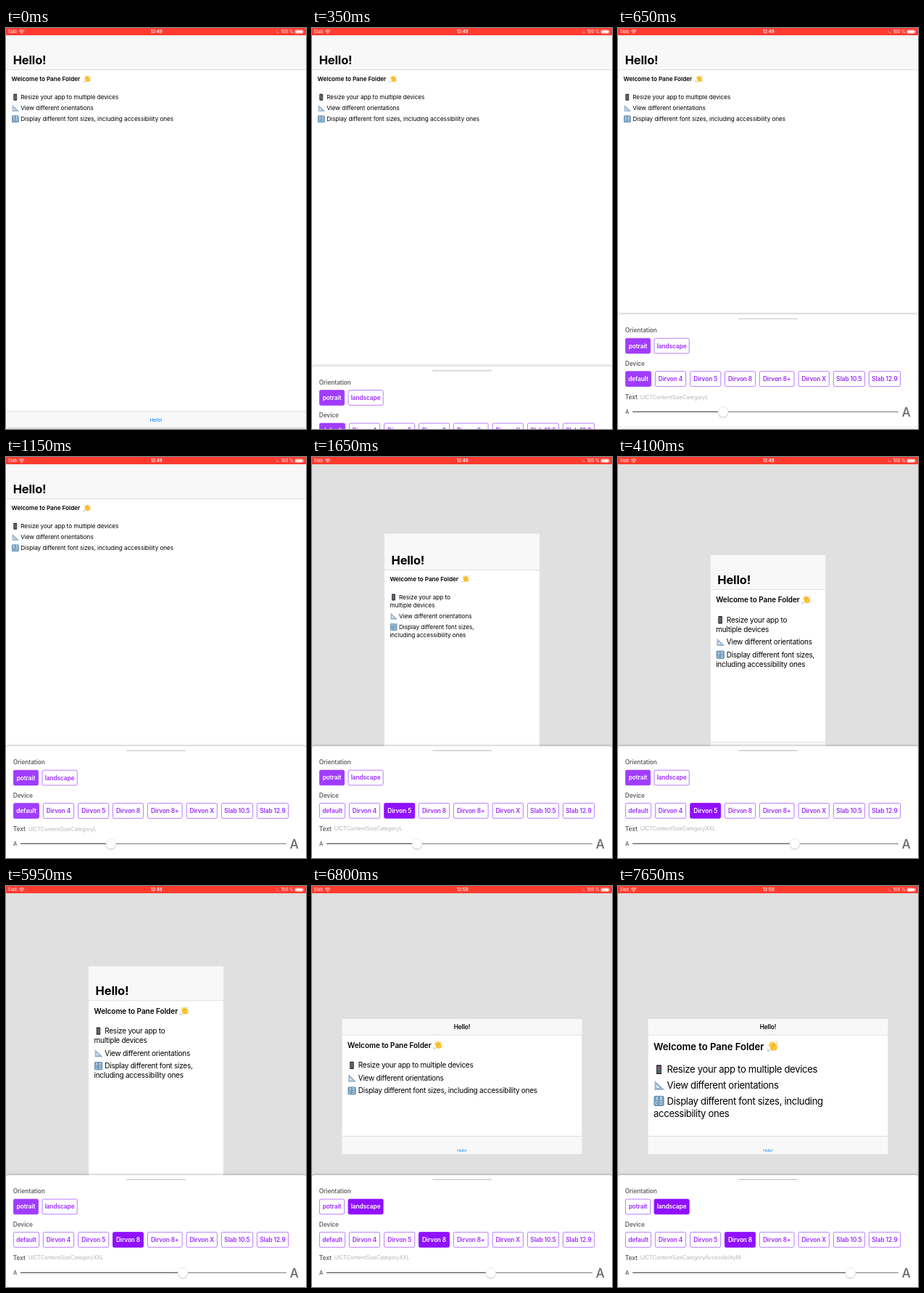
These frames come from a looping animation (414x552 px, 7700 ms). An HTML page:

```html
<!DOCTYPE html>
<html lang="en">
<head>
<meta charset="utf-8">
<title>Layout preview</title>
<style>
html, body { margin: 0; width: 100%; height: 100%; overflow: hidden; background: #e0e0e0; }
svg { display: block; }
text { font-family: Inter, "Liberation Sans", sans-serif; white-space: pre; }
#sheet { filter: drop-shadow(0 -1px 1.8px rgba(0, 0, 0, .24)); }
</style>
</head>
<body>
<svg id="stage" width="414" height="552" viewBox="0 0 414 552">
  <defs>
    <symbol id="hand" viewBox="0 0 20 20">
      <g stroke="#fcc534" stroke-linecap="round" fill="none">
        <path d="M4.6 7.2 10 12.4M6.2 4.2 12 10M9.3 2.8 14 8.6M12.6 3.4 15.6 9" stroke-width="2.6"/>
        <path d="M16.6 6.4Q15.6 9 17 12" stroke-width="2.8"/>
        <path d="M10.5 12.5 13.8 12.2" stroke-width="9.5"/>
      </g>
      <path d="M6.8 8.2 10 11.2M8.8 6 12 9.3M11.5 5 13.8 8.2" stroke="#c98a1c" stroke-width=".8" fill="none"/>
      <path d="M1.5 13.5Q2.6 17 6 18.2M1 16.3Q1.8 18.3 3.8 19.2M15.8 1.2Q18.4 1.9 19 4.4" stroke="#8ba6b8" stroke-width="1" fill="none"/>
    </symbol>
    <symbol id="phone" viewBox="0 0 20 20">
      <rect x="5.2" y="1.4" width="9.4" height="17.2" rx="1.6" fill="#25272b"/>
      <rect x="6.1" y="3.4" width="7.6" height="12.8" fill="#46536b"/>
      <path d="M6.8 5.2h6.4M6.8 8h6.4" stroke="#b7705d" stroke-width="1.5" stroke-dasharray="1.5 .95"/>
      <path d="M6.8 11h6.4M6.8 14.6h6.4" stroke="#6ea07c" stroke-width="1.5" stroke-dasharray="1.5 .95"/>
      <circle cx="9.9" cy="17.4" r=".7" fill="#777"/>
    </symbol>
    <symbol id="ruler" viewBox="0 0 20 20">
      <path d="M2 2V18H19ZM5.6 9.8 10.8 14.7H5.6Z" fill="#9db9d3" fill-rule="evenodd"/>
      <path d="M2 2 19 18H2" fill="none" stroke="#7593b2" stroke-width=".9"/>
    </symbol>
    <symbol id="abcd" viewBox="0 0 20 20">
      <rect x=".5" y=".5" width="19" height="19" rx="3" fill="#6b96b8"/>
      <g fill="#fff" font-size="8.2" font-weight="500" text-anchor="middle" opacity=".9">
        <text x="6" y="9">A</text><text x="14" y="9">B</text>
        <text x="6" y="17.2">C</text><text x="14" y="17.2">D</text>
      </g>
    </symbol>
  </defs>
  <rect width="414" height="552" fill="#e0e0e0"/>
  <g id="app"></g>
  <g id="sheet"></g>
  <g id="status"></g>
</svg>
<script>
const LOOP = 7700;
const PT = 414 / 834;
const LIGHT = '#a03cff', DEEP = '#9010ff', INK = '#666', HAIR = '#cdcdcd';
const BODY = 8.3;
const TAP = { small: 1450, large: 5050, turn: 6200 };

const sizeNames = ['XS', 'S', 'M', 'L', 'XL', 'XXL', 'XXXL', 'AccessibilityM'];
// font, tracking, title y, first gap, item pitch, line pitch, icon, hand offset
const typeScale = {
  L: [8.2, -.006, 12.5, 25, 15, 11, 10.4, 98.5],
  XL: [9.1, -.016, 13.2, 26.3, 16.2, 12, 11.2, 108],
  XXL: [10, -.024, 13.9, 27.7, 17.5, 13, 12, 118],
  XXXL: [11, -.026, 14.6, 29.4, 19, 14.5, 13.2, 130],
  AccessibilityM: [13.2, -.028, 15.6, 31.8, 21.6, 17, 15, 156]
};

const frame = (w, h, nav) => ({ w: w * PT, h: h * PT, nav: nav * PT });
const full = { w: 414, h: 552, nav: 57.8 };
const small = frame(320, 568, 96);
const large = frame(375, 667, 96);
const wide = frame(667, 375, 45);

const devices = [
  ['default', 10, 36], ['Dirvon 4', 51, 43], ['Dirvon 5', 99.2, 43], ['Dirvon 8', 147, 43],
  ['Dirvon 8+', 195, 48.5], ['Dirvon X', 248.8, 43], ['Slab 10.5', 297, 44], ['Slab 12.9', 346, 44]
];

const clamp = v => Math.max(0, Math.min(1, v));
const ease = v => v < .5 ? 2 * v * v : 1 - 2 * (1 - v) ** 2;
const mix = (a, b, k) => a + (b - a) * k;
const ramp = (t, from, to) => ease(clamp((t - from) / (to - from)));

// Text is placed by the vertical centre of its capitals.
function label(s, x, cy, size, o = {}) {
  const { weight = 400, fill = '#000', track = -.01, anchor = 'start' } = o;
  return `<text x="${x}" y="${cy + size * .36}" font-size="${size}" font-weight="${weight}" fill="${fill}"
    letter-spacing="${track * size}" text-anchor="${anchor}">${s}</text>`;
}
const rect = (x, y, w, h, fill, extra = '') =>
  `<rect x="${x}" y="${y}" width="${w}" height="${h}" fill="${fill}" ${extra}/>`;
const icon = (id, x, cy, s) =>
  `<use href="#${id}" x="${x}" y="${cy - s / 2}" width="${s}" height="${s}"/>`;

function deviceAt(t) {
  const [from, to, tap] = t < TAP.large ? [full, small, TAP.small]
    : t < TAP.turn ? [small, large, TAP.large] : [large, wide, TAP.turn];
  const k = ramp(t, tap, tap + 300);
  return { w: mix(from.w, to.w, k), h: mix(from.h, to.h, k), nav: mix(from.nav, to.nav, k) };
}

function rowsAt(t, size) {
  const narrow = t >= TAP.small && t < TAP.turn;
  const huge = size === 'AccessibilityM';
  return [
    ['phone', narrow ? ['Resize your app to', 'multiple devices'] : ['Resize your app to multiple devices']],
    ['ruler', ['View different orientations']],
    ['abcd', narrow ? ['Display different font sizes,', 'including accessibility ones']
      : huge ? ['Display different font sizes, including', 'accessibility ones']
      : ['Display different font sizes, including accessibility ones']]
  ];
}

function drawApp(t, size) {
  const { w, h, nav } = deviceAt(t);
  const [font, track, titleY, gap, pitch, line, iconSize, handX] = typeScale[size];
  const bar = 49 * PT, left = 7.6, isWide = t >= TAP.turn, isFull = t < TAP.small;
  let s = rect(0, 0, w, h, '#fff') + rect(0, 0, w, nav, '#f8f8f8') + rect(0, nav - .5, w, .6, HAIR);
  s += isWide
    ? label('Hello!', w / 2, nav / 2, BODY, { weight: 600, anchor: 'middle' })
    : label('Hello!', 9.7, nav - 13.8, 16.5, { weight: 700 });

  let y = nav + titleY;
  s += label('Welcome to Pane Folder', left, y, font, { weight: 600, track: -.005 });
  s += icon('hand', left + handX, y, iconSize * 1.06);
  y += gap;
  for (const [id, lines] of rowsAt(t, size)) {
    s += icon(id, left, y, iconSize);
    lines.forEach((text, i) => {
      if (i) y += line;
      s += label(text, i ? left : left + iconSize + font * .27, y, font, { track });
    });
    y += pitch;
  }

  s += rect(0, h - bar, w, bar, '#f8f8f8') + rect(0, h - bar - .3, w, .6, HAIR);
  s += label('Hello!', w / 2, h - (isFull ? 12 : 4.6), isFull ? 6.4 : 5, { fill: '#007aff', anchor: 'middle', track: 0 });
  return `<svg x="${207 - w / 2}" y="${276 - h / 2}" width="${w}" height="${h}">${s}</svg>`;
}

function button([name, x, w], y, on, tint) {
  return rect(x + .4, y + .4, w - .8, 20.7, on ? tint : '#fff', `rx="1.8" stroke="${on ? tint : '#a95cff'}" stroke-width=".8"`)
    + label(name, x + w / 2, y + 10.8, BODY, { weight: 600, fill: on ? '#fff' : '#9a2cff', anchor: 'middle' });
}

function sheetTop(t) {
  const s = Math.max(0, t - 200) / 1000, w = 7, a = 8.2;
  const rest = Math.exp(-a * s) * (Math.cos(w * s) + a / w * Math.sin(w * s));
  return 398 + 154 * rest;
}

function drawSheet(t, thumb, size) {
  const head = { weight: 600, fill: INK };
  const picked = t < TAP.small ? 0 : t < TAP.large ? 2 : 3;
  const turned = t >= TAP.turn;
  let s = `<path d="M0 154V3Q0 0 3 0H411Q414 0 414 3V154Z" fill="#fff"/>`;
  s += rect(166, 5.3, 82, 1.6, '#d4d4d4', 'rx=".8"');
  s += label('Orientation', 9.8, 22.4, BODY, head);
  s += button(['potrait', 10, 35], 32.7, !turned, LIGHT);
  s += button(['landscape', 49.6, 49], 32.7, turned, DEEP);
  s += label('Device', 9.8, 68, BODY, head);
  devices.forEach((d, i) => { s += button(d, 78.2, i === picked, i ? DEEP : LIGHT); });
  s += label('Text', 9.8, 113.6, BODY, head);
  s += label('UICTContentSizeCategory' + size, 30.8, 113.8, 7.3, { fill: '#b5b5b5', track: -.008 });
  s += label('A', 10, 134.6, 7.2, { weight: 600, fill: INK });
  s += label('A', 391.8, 134.6, 17, { weight: 500, fill: INK });
  s += rect(20, 133.7, 367, 1.3, '#8c8c8c', 'rx=".6"') + rect(20, 133.7, thumb - 20, 1.3, '#666', 'rx=".6"');
  s += `<circle cx="${thumb}" cy="135.8" r="7.4" fill="#000" opacity=".1"/>
    <circle cx="${thumb}" cy="134.4" r="6.9" fill="#fff" stroke="#d2d2d2" stroke-width=".5"/>`;
  return `<g transform="translate(0 ${sheetTop(t)})">${s}</g>`;
}

function drawStatus(t) {
  const white = { fill: '#fff', track: 0 };
  return rect(0, 0, 414, 10, '#ff3b30')
    + label('Slab', 2.8, 5.2, 6, white)
    + `<g fill="none" stroke="#fff" stroke-width="1"><path d="M18.2 4.3Q21.7 1.2 25.2 4.3M19.6 5.8Q21.7 4 23.8 5.8"/></g>
      <path d="M20.5 6.9Q21.7 6 22.9 6.9L21.7 8.1Z" fill="#fff"/>`
    + label(t < 6600 ? '12:49' : '12:50', 207.7, 5.2, 6, { ...white, weight: 600, anchor: 'middle' })
    + `<path d="M373.6 3.4A2.2 2.2 0 0 0 376.6 6.5" fill="none" stroke="#fff" stroke-width=".7" opacity=".6"/>`
    + label('100 %', 397, 5.2, 6, { ...white, anchor: 'end' })
    + rect(398.9, 2.9, 10.8, 4.6, 'none', 'rx="1" stroke="#fff" stroke-width=".5"')
    + rect(399.6, 3.6, 9.4, 3.2, '#fff', 'rx=".5"') + rect(410.3, 4.4, .7, 1.6, '#fff');
}

const layers = ['app', 'sheet', 'status'].map(id => ({ el: document.getElementById(id), last: '' }));
let start;

function tick(now) {
  start ??= now;
  const t = (now - start) % LOOP;
  const thumb = 145 + 99 * ramp(t, 2900, 3800) + 77 * ramp(t, 6700, 7450);
  const size = sizeNames[Math.floor((thumb - 20) / 367 * 9)];
  [drawApp(t, size), drawSheet(t, thumb, size), drawStatus(t)].forEach((markup, i) => {
    const layer = layers[i];
    if (markup !== layer.last) layer.el.innerHTML = layer.last = markup;
  });
  requestAnimationFrame(tick);
}
tick(performance.now());
</script>
</body>
</html>
```
